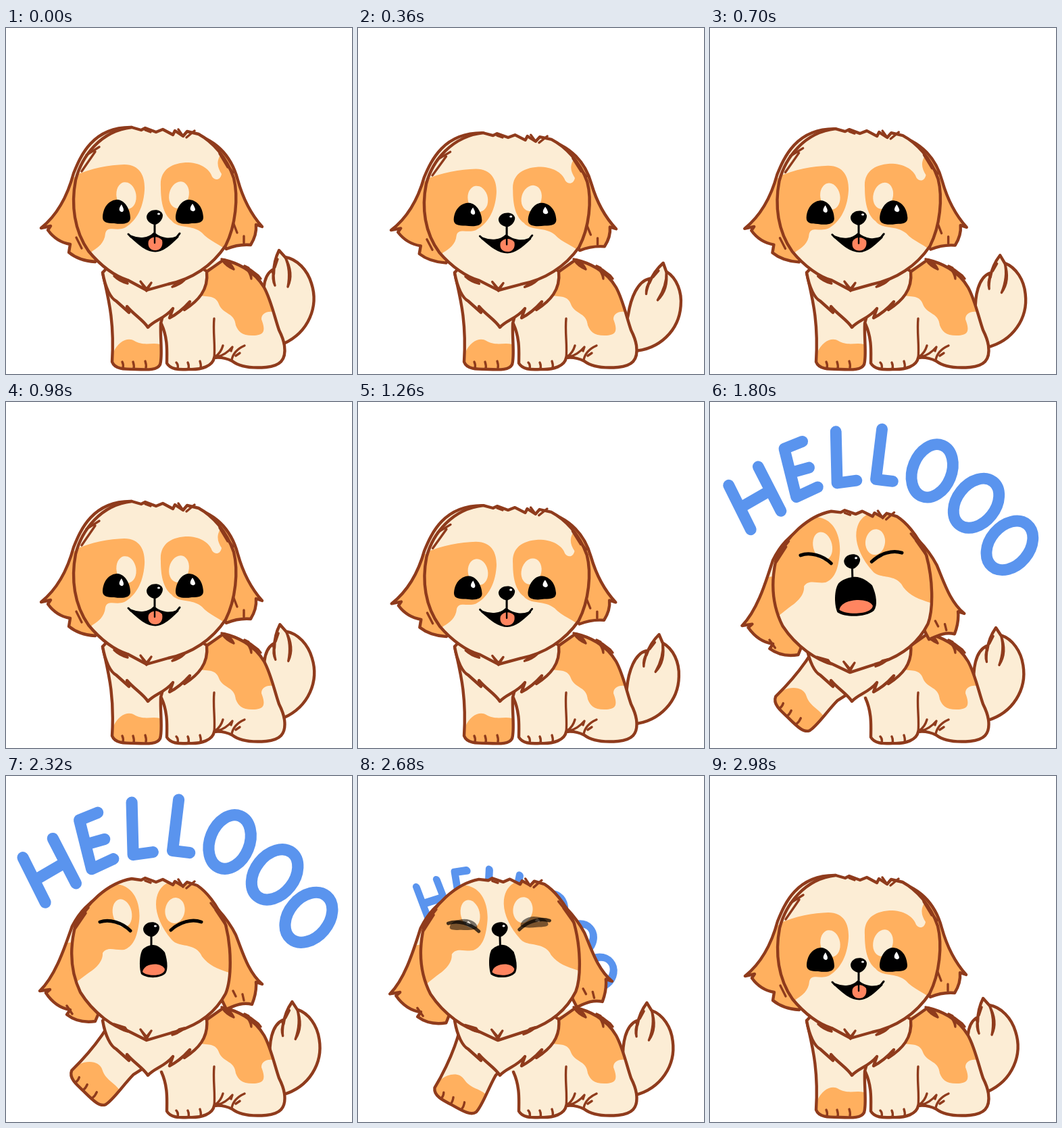
These frames come from a looping animation (512 by 512 pixels, 3000 ms). An HTML page:

```html
<!DOCTYPE html>
<html lang="en">
<head>
<meta charset="utf-8">
<title>Hello puppy</title>
<style>
  html, body { margin: 0; width: 100%; height: 100%; overflow: hidden; background: #fff; }
  svg { display: block; width: 100vw; height: 100vh; }
  .cream { fill: #fcedd5; }
  .orange { fill: #ffb05f; }
  .brown { fill: #8f3b1c; }
  .tongue { fill: #ff8560; }
  .line { stroke: #8f3b1c; stroke-width: 4.4; stroke-linejoin: round; stroke-linecap: round; }
  .thin { stroke-width: 3.4; }
  .word { fill: none; stroke: #5a94ee; stroke-width: 17; stroke-linecap: round; stroke-linejoin: round; }
  .lid { fill: none; stroke: #000; stroke-width: 5; stroke-linecap: round; }
</style>
</head>
<body>
<svg viewBox="0 0 512 512" fill="none">
  <defs><clipPath id="headClip"><path data-morph="head"/></clipPath></defs>

  <g id="word" class="word" role="img" aria-label="HELLOOO">
    <path d="M26 122L59 188M70 94L104 160M44 155L87 130"/>
    <path d="M136 56L109 67L127 139L159 124M118 103L146 95"/>
    <path d="M186 41L188 118L217 114M255 37L246 112L271 115"/>
    <ellipse cx="330" cy="99" rx="29" ry="41" transform="rotate(22 330 99)"/>
    <ellipse cx="396" cy="147" rx="29" ry="41" transform="rotate(38 396 147)"/>
    <ellipse cx="446" cy="210" rx="29.5" ry="41" transform="rotate(40 446 210)"/>
  </g>

  <g id="tail">
    <path class="line cream" d="M385 420C379 395 379 368 394 358L396 364C396 350 399 339 404 329L413 339C431 342 446 358 452 378C463 412 448 450 411 467L390 450Z"/>
    <path class="line thin brown" d="M413 339C422 355 423 370 417 383C420 367 419 352 413 339ZM396 361C394 369 395 375 398 381C396 375 396 368 396 361ZM402 342C400 346 399 350 398 354Z"/>
  </g>

  <path class="cream" d="M290 350L322 343C340 347 367 358 382 384C392 402 398 430 404 447C408 455 411 463 412 470C415 492 405 500 385 502C360 504 345 501 335 493C325 488 316 487 308 488C306 500 290 506 270 505C255 506 243 505 238 496C238 480 240 460 230 438L200 430L180 350Z"/>
  <path class="orange" d="M290 360L322 344C350 350 377 370 388 400C391 408 393 414 394 420C385 419 378 423 378 431C384 447 383 454 368 455C350 456 344 450 340 440C338 421 324 425 316 411C311 395 300 398 286 396Z"/>
  <path class="line" d="M298 360L322 343C340 347 367 358 382 384C392 402 398 430 404 447C408 455 411 463 412 470C415 492 405 500 385 502C360 504 345 501 335 493C325 488 316 487 308 488C306 500 290 506 270 505C255 506 243 505 238 496C238 480 240 460 230 438"/>
  <path class="line thin" d="M308 430C306 450 310 470 308 488M310 486C316 482 319 477 321 470M312 487C323 484 330 478 335 472L333 478M334 491C336 481 344 474 353 470M340 485L346 481M254 504C255 500 254 497 252 495M270 505C271 500 270 497 269 495M288 503C289 499 288 496 287 493"/>
  <path class="line thin brown" d="M319 342C325 351 330 354 337 357C334 351 331 347 326 344ZM353 352C358 358 362 364 363 371C363 364 362 360 359 355ZM361 357C366 361 372 365 377 371L373 366Z"/>

  <g id="leg">
    <path class="cream" d="M143 362C150 395 161 430 157 494C161 505 175 505 192 505C212 506 224 506 228 498C232 486 228 460 229 437L234 419L240 380Z"/>
    <path class="orange" d="M159 480C166 464 180 457 190 463C204 471 215 465 228 468L229 494C224 506 212 506 192 505C175 505 161 505 157 494Z"/>
    <path class="line" d="M143 362C150 395 161 430 157 494C161 505 175 505 192 505C212 506 224 506 228 498C232 486 228 460 229 437L234 419"/>
    <path class="line thin" d="M173 503C174 499 173 496 172 494M189 504C190 500 189 497 188 494M207 503C208 499 207 496 206 493"/>
  </g>

  <path class="line cream" d="M143 362C147 385 155 400 163 404L182 421L179 412C190 425 203 432 210 443C220 432 235 430 247 415L242 429C254 423 263 415 272 405L264 417C284 404 300 388 297 360L200 300Z"/>

  <g id="head">
    <path class="orange" data-morph="earL"/><path class="cream" data-morph="earCap"/><path class="line" data-morph="earL"/>
    <path class="line orange" data-morph="earR"/>
    <path class="cream" data-morph="head"/>
    <g clip-path="url(#headClip)">
      <path class="orange" data-morph="patchL"/><path class="orange" data-morph="patchR"/>
    </g>
    <ellipse id="spotL" class="cream"/><ellipse id="spotR" class="cream"/>
    <path class="line" data-morph="head"/>
    <path class="line thin" data-morph="hair"/>
    <path class="line thin brown" d="M160 367C166 373 172 376 180 378L176 372ZM264 373C258 379 253 381 246 383L256 375ZM199 375L208 389L215 377L208 386Z"/>

    <g id="open" fill="#000">
      <g id="eyeL"><path id="eye" d="M143 280C144 262 155 254 165 254C177 255 184 270 184 281C184 290 172 291 160 289C150 289 143 288 143 280Z"/>
        <path fill="#fff" d="M171 261C168 265 167 268 168 270C170 273 174 273 174 269C174 266 172 264 171 261Z"/></g>
      <g id="eyeR"><use href="#eye" transform="translate(435) scale(-1 1)"/>
        <path fill="#fff" d="M276 260C273 264 272 267 273 269C275 272 280 272 280 268C279 265 278 263 276 260Z"/></g>
    </g>
    <path id="shut" class="lid" data-morph="lids"/>

    <g id="muzzle" fill="#000">
      <path d="M208 279C210 267 230 266 232 277C232 285 224 291 220 291C214 290 208 286 208 279Z"/>
      <ellipse cx="226" cy="275" rx="2" ry="1.6" fill="#fff"/>
      <path class="lid" style="stroke-width:3" d="M220 290L220 305"/>
      <g id="smile">
        <path stroke="#000" stroke-width="3" stroke-linejoin="round" d="M184 308C198 314 211 312 219 304C230 313 243 314 254 309C243 320 232 330 221 330C208 330 197 320 184 308Z"/>
        <path class="lid" style="stroke-width:3" d="M181 305L185 309M257 304L253 309"/>
        <path class="tongue" d="M211 315C215 308 225 307 231 314C233 323 228 329 221 329C213 329 209 323 211 315Z"/>
        <path class="lid" style="stroke-width:2.4" d="M220 306L220 318"/>
      </g>
    </g>
    <g id="shout">
      <path fill="#000" d="M216 250C224 249 231 256 235 261C239 273 240 286 236 292C228 300 208 300 200 293C197 285 197 265 202 257C207 252 211 251 216 250Z"/>
      <path class="tongue" d="M202 290C204 276 231 275 235 286C234 297 209 297 202 290Z"/>
    </g>
  </g>
</svg>
<script>
const $ = id => document.getElementById(id);
const lerp = (a, b, k) => a + (b - a) * k;

// Each pair is the sitting shape and the shouting shape.
const shapes = {
  head: [
    "M186 147C140 152 112 190 103 225C96 262 101 300 122 330C140 352 162 368 180 373L208 388L240 379C275 372 305 352 325 322C340 292 344 250 337 222C326 190 305 168 285 157L268 153L262 160L250 152L247 158L232 150L222 154L206 148L200 151Z",
    "M186 152C150 158 118 190 103 220C92 262 98 295 110 320C130 352 160 372 180 377L208 391L245 380C285 370 310 350 325 322C334 300 334 255 325 220C312 188 295 170 283 162L268 157L262 163L250 156L247 161L232 153L222 157L206 151L200 154Z"],
  earL: [
    "M186 147C128 146 110 190 100 215C92 245 78 275 52 296L66 293L62 299C72 313 83 318 95 320L93 332C105 342 118 345 132 346L180 250Z",
    "M160 166C120 185 107 205 98 222C88 250 74 295 50 318L65 316L59 321C69 336 82 344 95 346L90 353C103 363 118 365 132 363L180 250Z"],
  earCap: [
    "M186 147C128 146 110 190 97 222L135 210Z",
    "M160 166C120 185 107 205 90 247L120 244Z"],
  earR: [
    "M270 155C315 165 335 195 343 225C350 250 362 275 379 294L370 291C371 303 367 313 362 321C350 320 338 322 326 327L280 250Z",
    "M270 165C305 180 330 215 340 235C350 260 358 290 379 308L370 305C371 318 368 328 364 338C350 334 338 340 326 345L280 250Z"],
  patchL: [
    "M90 224C120 208 150 203 175 202C200 202 206 222 205 240C203 270 190 288 175 296C163 301 150 292 147 304C146 318 136 325 128 330L112 345L85 300Z",
    "M90 150C110 145 140 150 160 160C190 160 200 190 197 215C194 240 188 252 175 257C163 259 150 251 143 262C144 277 128 288 120 293L104 305L75 280Z"],
  patchR: [
    "M229 235C227 210 245 199 270 199C290 200 302 210 305 220C309 226 317 226 319 216C314 208 311 200 316 190L360 180L360 300L334 335C318 320 300 315 290 303C275 290 255 298 245 285C232 275 229 255 229 235Z",
    "M222 190C222 175 228 165 236 160C250 150 270 150 290 150C300 155 310 160 320 165C330 175 335 180 340 185L360 200L355 280L330 291C312 285 300 280 290 267C280 245 255 255 245 242C230 225 222 205 222 190Z"],
  hair: [
    "M138 176L119 188M132 183L112 212M316 186L328 206M320 192L336 214M337 290L342 303M352 308L352 318M104 310L112 326M262 160L255 150M267 162L279 152M206 151L214 154",
    "M122 195L108 212M118 203L103 225M303 188L318 208M310 198L326 222M336 318L340 326M350 323L352 332M90 340L98 352M262 164L255 153M267 166L279 156M206 155L214 158"],
  lids: [
    "M142 270C156 264 174 270 186 281M251 281C263 270 280 266 293 270",
    "M139 216C153 211 172 217 184 229M244 228C257 216 275 211 289 216"]
};

const NUM = /-?[\d.]+/g;
const ends = {};
for (const n in shapes) ends[n] = shapes[n][1].match(NUM);
function morph(name, k) {
  let i = 0;
  return shapes[name][0].replace(NUM, v => lerp(+v, +ends[name][i++], k).toFixed(2));
}

const smooth = x => x * x * (3 - 2 * x);
function track(t, keys, ease = smooth) {
  const i = keys.findIndex(p => p[0] > t);
  if (i === 0) return keys[0][1];
  if (i < 0) return keys[keys.length - 1][1];
  const [t0, a] = keys[i - 1], [t1, b] = keys[i];
  return lerp(a, b, ease((t - t0) / (t1 - t0)));
}

const wagKeys = [[0, 0], [500, .5], [700, .775], [1260, 1.317], [1800, 1.81], [2320, 2.19], [2680, 2.785], [3000, 3]];
const poseKeys = [[1380, 0], [1560, 1], [2680, 1], [2900, 0]];
const eyeKeys = [[1400, 0], [1500, 1], [2640, 1], [2760, 0]];
const mouthKeys = [[1400, 0], [1500, 1], [2690, 1], [2770, 0]];
const legKeys = [[1400, 0], [1600, 42], [2600, 42], [2680, 27], [2800, 0]];
const nodKeys = [[1640, 0], [1800, 1], [1960, 0], [2140, 1], [2320, 0], [2500, 1], [2680, 0]];
const leanKeys = [...nodKeys.slice(0, -1), [2680, 1.1], [2900, 0]];
const wordKeys = [[1540, .2], [1620, .77], [1700, 1.016], [1800, .99], [2000, 1.016], [2200, .99],
  [2400, 1.016], [2600, .99], [2680, .65], [2740, .2]];

const move = (id, value) => $(id).setAttribute("transform", value);
const fade = (id, value) => $(id).setAttribute("opacity", value);
const scaleAt = (x, y, sx, sy) => `translate(${x} ${y}) scale(${sx} ${sy}) translate(${-x} ${-y})`;

function spot(id, from, to, k) {
  const [x, y, rx, ry, turn] = from.map((v, i) => lerp(v, to[i], k));
  const attrs = { cx: x, cy: y, rx, ry, transform: `rotate(${turn} ${x} ${y})` };
  for (const a in attrs) $(id).setAttribute(a, attrs[a]);
}

function draw(t) {
  const wag = (1 - Math.cos(2 * Math.PI * track(t, wagKeys, x => x))) / 2;
  const pose = track(t, poseKeys), shut = track(t, eyeKeys), shout = track(t, mouthKeys);
  const nod = track(t, nodKeys), lean = track(t, leanKeys);

  move("tail", `rotate(${27 * wag} 380 460)`);
  move("leg", `rotate(${track(t, legKeys)} 203 387)`);

  // The word leans down to the right as it shrinks behind the head.
  const size = track(t, wordKeys), gone = Math.max(0, 1 - size);
  move("word", `translate(172 312) matrix(${size} ${.47 * gone} ${-.14 * gone} ${size} 0 0) translate(-172 -312)`);
  fade("word", size > .25 ? 1 : 0);

  const squash = .05 * wag * wag * (1 - pose);
  move("head", `translate(${-3 * lean} ${9 * nod}) rotate(${-1.4 * lean} 215 300) `
    + scaleAt(215, 392, 1 + .55 * squash, 1 - squash));
  document.querySelectorAll("[data-morph]").forEach(p => p.setAttribute("d", morph(p.dataset.morph, pose)));
  spot("spotL", [178, 248, 14.5, 20, -10], [172, 203, 14, 21, -12], pose);
  spot("spotR", [256, 247, 14.5, 20, 14], [250, 199, 14.5, 19, 8], pose);

  const lid = lerp(1, .25, shut);
  move("eyeL", `translate(${-2 * pose} ${-54 * pose}) ${scaleAt(163, 273, 1, lid)}`);
  move("eyeR", `translate(${-5 * pose} ${-55 * pose}) ${scaleAt(272, 273, 1, lid)}`);
  fade("open", Math.sqrt(1 - shut));
  fade("shut", shut);

  move("muzzle", `translate(${-5 * pose} ${-53 * pose})`);
  fade("smile", 1 - shout);
  move("shout", `translate(${6 * (1 - pose)} ${54 * (1 - pose)}) ${scaleAt(217, 250, 1 + .5 * nod, 1 + .2 * nod)}`);
  fade("shout", shout);
}

function frame() {
  draw(performance.now() % 3000);
  requestAnimationFrame(frame);
}
frame();
</script>
</body>
</html>
```
